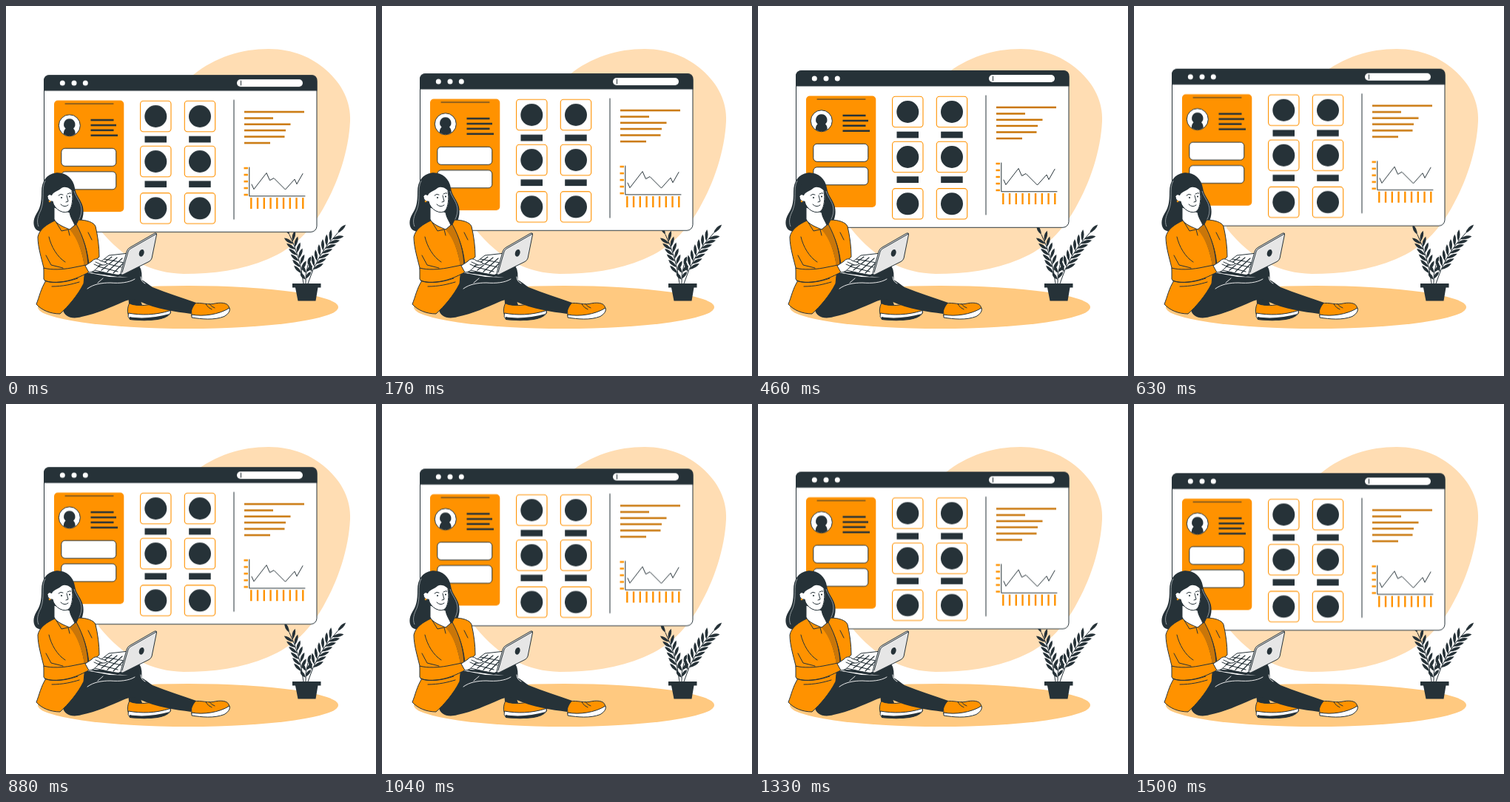
Write an HTML page that moves like this. It is 500 px wide and 500 px high and loops after 1540 ms.

```html
<!DOCTYPE html>
<html lang="en">
<head>
<meta charset="utf-8">
<title>Working at a laptop</title>
<style>
html, body { margin: 0; width: 100%; height: 100%; overflow: hidden; background: #fff; }
svg { display: block; width: 100vw; height: 100vh; }
.d { fill: #263238; }
.o { fill: #ff9200; }
.w { fill: #fff; }
.l { fill: none; stroke: #263238; stroke-width: 1; stroke-linecap: round; stroke-linejoin: round; }
.s { stroke: #263238; stroke-width: 1; stroke-linejoin: round; }
.t { fill: none; stroke: #ff9200; stroke-width: 1.1; }
#window { animation: float 770ms cubic-bezier(.3, .2, .7, .8) -35ms infinite alternate; }
@keyframes float {
  from { transform: translateY(.45px); }
  to { transform: translateY(-9.35px); }
}
</style>
</head>
<body>
<svg viewBox="0 0 500 500">
  <path fill="#ffddb3" d="M253 93C283 69 318 58 355 58C388 58 414 70 432 86C455 106 466 130 465 156C463 196 449 238 429 273C412 303 390 327 354 342C318 357 280 362 240 362C198 361 160 344 125 300L125 190Z"/>
  <ellipse cx="246" cy="407" rx="203" ry="29" fill="#ffc980"/>

  <g id="plant">
    <path class="d" d="M387 375H425.500V380.500H421.500L418.500 398.500H394.500L391 380.500H387Z"/>
  </g>

  <g id="window">
    <rect class="w s" x="51.500" y="93.500" width="368.500" height="211.800" rx="8"/>
    <path class="d" d="M51 114.500V101Q51 93 59 93H412.500Q420.500 93 420.500 101V114.500Z"/>
    <g class="w">
      <circle cx="76.300" cy="104" r="3.500"/><circle cx="92" cy="104" r="3.500"/><circle cx="107.300" cy="104" r="3.500"/>
      <rect x="312" y="99" width="89" height="10" rx="5"/>
    </g>
    <path class="l" d="M317.500 101V107"/>

    <rect class="o" x="65" y="127.500" width="94.300" height="150.500" rx="5"/>
    <path class="l" d="M80 132H145"/>
    <circle class="w s" cx="85.800" cy="161.300" r="14.500"/>
    <path class="d" d="M85.800 152.300A7.600 7.600 0 0 1 91 165.500Q94 168 93.500 173Q86 178 78 173Q77.500 168 80.600 165.500A7.600 7.600 0 0 1 85.800 152.300Z"/>
    <path class="l" stroke-linecap="butt" style="stroke-width:2.600;stroke-linecap:butt" d="M114.500 154H145.500M114.500 161H149M114.500 167.700H145.500M114.500 174.800H151"/>
    <rect class="w s" x="74.800" y="192.300" width="74" height="24" rx="5"/>
    <rect class="w s" x="74.800" y="223.800" width="74" height="24" rx="5"/>

    <g id="tiles"></g>
    <path class="l" d="M308 127V288"/>
    <path fill="none" stroke="#c97609" stroke-width="2.600" d="M322 143H403M322 151.500H361M322 159.700H384.500M322 168H378M322 176.500H376.500M322 185H357"/>
    <path class="l" d="M328.800 218V256.800H404M332 241L335 247.500L352 225.500L356.500 235.500L362 232.500L377.500 248L390 234L393 240.500L401 226.500"/>
    <path id="ticks" fill="none" stroke="#ff9200" stroke-width="2.400"/>
  </g>

  <g id="woman">
    <!-- hair behind -->
    <path class="d" d="M67 225.500C55 227 48 237 48 251C48 267 46 273 41 281C36 289 36 299 42 303C49 307 60 304 68 300L95 300C103 293 106 282 104 272C102 262 95 258 93 246C91 233 80 224 67 225.500Z"/>
    <path fill="none" stroke="#aab2b5" stroke-width=".8" d="M53 236C47 248 53 260 47 276C43 284 41 291 44 298M92 250C95 260 102 265 102 276C102 283 99 288 97 292"/>

    <!-- far leg and shoe -->
    <path class="o s" d="M167 401C179 407 190 404 198 403C205 407 215 408 222 411C224 415 221 418 213 420C199 423 181 423 167 420C163 415 164 407 167 401Z"/>
    <path class="w s" d="M165.500 415C182 418 202 418 222 411.500Q224 417 214 421C198 425 181 425 167 423Q164 420 165.500 415Z"/>
    <path class="d" d="M167 420C183 423 203 421 221 416Q217 422 205 424C190 426 176 425 167 424Z"/>
    <path class="d" d="M116 361L178 349Q184 354 183.500 367C183 383 180 396 184 404Q173 406 166 402C165 390 166 377 165 367Z"/>

    <!-- near leg and shoe -->
    <path class="o s" d="M250 403C260 399 270 404 280 402.500C290 400 299 401 301 406C304 412 299 417 291 420C279 424 264 422 251 419Z"/>
    <path class="w s" d="M251 417C266 420 288 417 302 408Q304 414 295 419.500C281 425 264 423 251 421Z"/>
    <path class="l" d="M270 403Q273 408 278 410M275 402.500Q278 407 282 408"/>
    <path class="d" d="M108 360L140 366L174 367C184 368 189 374 198 380C218 388 238 394 257 401Q251 408 250 416C229 413 204 410 180 399C172 395 167 396 158 400C142 407 122 416 102 420C88 424 79 419 77 411C84 394 97 376 108 360Z"/>
    <path fill="none" stroke="#fff" stroke-width=".9" stroke-linecap="round" d="M110 382C118 376 129 374 141 374C154 375 166 374 174 369M124 374L131 368M182 366Q182 372 188 375"/>

    <!-- jacket and top -->
    <path class="d" d="M76 291L101 289L111 325L115 355L101 366L89 340Z"/>
    <path class="o s" d="M66 290C55 295 45 302 43 312C43 326 48 341 51 354L54 371C47 382 45 393 41 403C48 411 60 416 73 416C84 406 97 391 105 375L107 354C104 333 97 312 86 300L75 291Z"/>
    <path class="o s" d="M98 289C108 289 119 292 121 298C124 311 126 325 126 339L117 347L112 352C111 333 105 312 94 297Z"/>
    <path fill="#c97609" d="M85 301L95 295C105 313 111 333 111 353L106 354C104 334 97 314 85 301Z"/>
    <path class="l" d="M85 301L95 295C105 313 111 333 111 353"/>
    <path class="o s" d="M51 354C61 357 77 356 88 354L108 350L113 359C101 366 87 372 72 373C61 374 53 373 51 369Z"/>
    <path class="l" d="M58 312C61 325 69 339 80 346M54 337L61 350L77 354M67 291L75 304L84 302L86 310M52 371C66 376 82 373 97 368M62 379C77 379 89 376 99 373M111 306L116 316"/>

    <!-- neck, face -->
    <path class="w s" d="M65 272L65 288C68 295 79 299 86 302L93 296C91 291 87 286 86 279Z"/>
    <path class="w" d="M62 249C67 244 81 240 88 246C91 253 91 264 88 272C85 280 79 281 73 277C68 274 64 269 63 264Q57 265 56 258Q58 253 62 256Z"/>
    <path class="l" d="M89 250C91 261 89 271 86 276Q81 281 73 277Q65 273 63 264Q57 265 56 258"/>
    <path class="d" d="M56 254C56 240 64 229 76 231C84 232 91 240 91 252C87 246 80 243 75 246C69 251 64 251 62 256Z"/>
    <path class="l" d="M71 256Q74 253 77 255M83 254Q86 252 88 253M82 256L84 264L81 265M74 268Q79 273 84 269"/>
    <circle class="d" cx="75" cy="259" r="1.100"/><circle class="d" cx="86" cy="257.500" r="1.100"/>
    <circle class="o" cx="59" cy="264" r="1.300"/>

    <!-- laptop -->
    <path class="w s" d="M115 356L139 337L175 333L156 362L151 364Z"/>
    <path class="l" style="stroke-width:1.200" d="M121 355L143 339M129 357L150 340M137 359L157 341M145 361L162 344M121 351L151 359M127 346L156 353M133 342L160 347"/>
    <path class="d" d="M113 358L152 363L157 361L157 364.500L151 366L114 360Z"/>
    <path fill="#e6e6e6" class="s" d="M155 361L163 332Q164 328 168 326L201 307Q204 306 203.500 309L197 341Q196 344 193 345.500L158 363Q155 364 155 361Z"/>
    <path class="l" d="M157 360L165 332Q166 329 169 327.500L203 308"/>
    <ellipse class="d" cx="183.200" cy="333.800" rx="3.300" ry="5" transform="rotate(18 183.200 333.800)"/>

    <!-- hands -->
    <path class="w s" d="M107 351L116 345C119 341 124 341 127 344L136 347Q137 350 132 350L126 350C123 355 118 360 112 360Z"/>
    <path class="l" d="M121 346L130 350M119 349L126 352"/>
  </g>
</svg>
<script>
const $ = id => document.getElementById(id);
const add = (parent, tag, attrs) => {
  const el = document.createElementNS('http://www.w3.org/2000/svg', tag);
  for (const k in attrs) el.setAttribute(k, attrs[k]);
  return parent.appendChild(el);
};

// icon tiles with captions
for (const x of [202.3, 262]) {
  for (const y of [149, 210, 273.3]) {
    add($('tiles'), 'rect', { class: 't', x: x - 20.7, y: y - 20.7, width: 41.4, height: 41.4, rx: 4 });
    add($('tiles'), 'circle', { class: 'd', cx: x, cy: y, r: 15 });
  }
  for (const y of [175.7, 236.3])
    add($('tiles'), 'rect', { class: 'd', x: x - 14.8, y, width: 29.5, height: 8.7 });
}

// chart scales
let ticks = '';
for (let i = 0; i < 5; i++) ticks += `M321.500 ${219 + 9 * i}h5.500`;
for (let i = 0; i < 9; i++) ticks += `M${331.3 + 8.75 * i} 259v15`;
$('ticks').setAttribute('d', ticks);

// sprig along a quadratic curve, leaves in pairs and one at the tip
function sprig(a, c, b, pairs, len) {
  add($('plant'), 'path', { class: 'l', d: `M${a}Q${c} ${b}` });
  const at = (t, k) => (1 - t) ** 2 * a[k] + 2 * t * (1 - t) * c[k] + t * t * b[k];
  const slope = (t, k) => (1 - t) * (c[k] - a[k]) + t * (b[k] - c[k]);
  const leaf = (t, turn) => {
    const deg = Math.atan2(slope(t, 1), slope(t, 0)) * 180 / Math.PI + turn;
    add($('plant'), 'path', {
      class: 'd',
      d: `M0 0Q${len * .55} -4.600 ${len} 0Q${len * .6} 3.600 0 0Z`,
      transform: `translate(${at(t, 0)} ${at(t, 1)}) rotate(${deg})`
    });
  };
  for (let i = 0; i < pairs; i++) {
    const t = .2 + .72 * i / pairs;
    leaf(t, -36);
    leaf(t + .05, 36);
  }
  leaf(1, 0);
}
sprig([402, 375], [398, 340], [383, 309], 6, 15);
sprig([408, 375], [420, 336], [448, 307], 7, 16);
sprig([405, 375], [404, 362], [408, 350], 2, 12);
</script>
</body>
</html>
```
